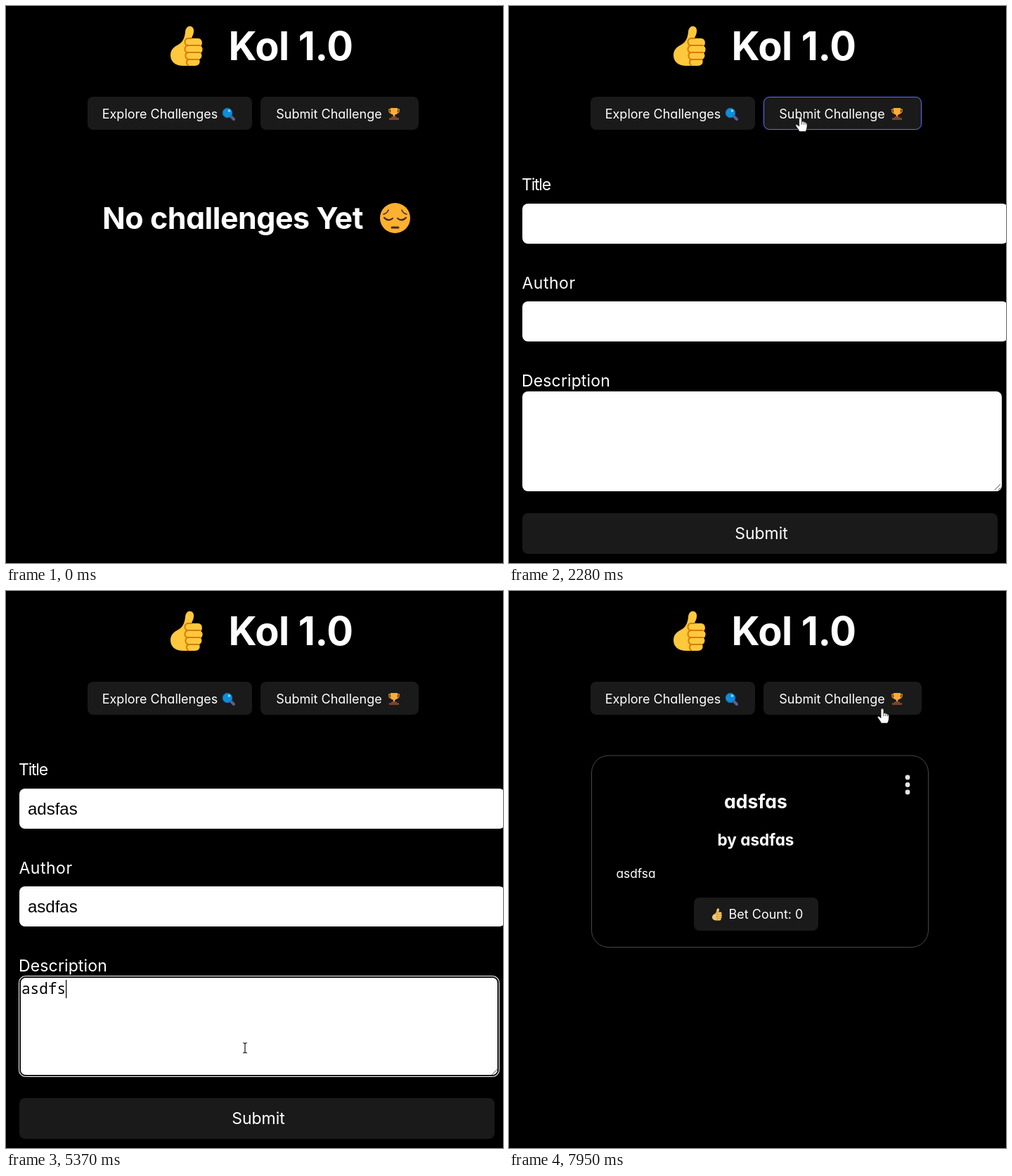
Write an HTML page that moves like this. It is 707 px wide and 792 px high and loops after 8 s.

```html
<!DOCTYPE html>
<html lang="en">
<head>
<meta charset="utf-8">
<title>Challenges</title>
<style>
  html, body { margin: 0; width: 100%; height: 100%; overflow: hidden; background: #000; }
  svg { display: block; }
  text { font: 18px Inter, Lato, sans-serif; font-feature-settings: "cv11"; fill: #fff; white-space: pre; }
  .mid { text-anchor: middle; }
  .bold { font-weight: 700; }
  .label { font-size: 23px; }
  .typed { font: 24px "Liberation Sans", Arial, sans-serif; fill: #000; }
  .mono { font: 21px "Noto Sans Mono", monospace; fill: #000; }
  .hint { font: 11.5px "Open Sans", sans-serif; }
  .btn { fill: #1a1a1a; }
  .edge { fill: none; stroke: #646cff; }
  .field { fill: #fff; }
  .ring rect { fill: none; stroke: #fff; }
  .ring rect + rect { stroke: #101010; stroke-width: 2; }
  .caret { fill: #000; }
</style>
</head>
<body>
<svg width="707" height="792" viewBox="0 0 707 792">
  <defs>
    <symbol id="thumb" viewBox="0 0 46 57" overflow="visible">
      <path fill="currentColor" d="M24 2C27-1 34 1 33 8C33 13 30 16 30 18H39C46 18 46 27 43 29C47 31 46 37 43 39C46 42 44 47 41 48C43 53 40 57 35 57H18C7 57 0 51 0 42C0 34 5 30 11 27C18 23 20 17 21 9C21 6 22 4 24 2Z"/>
      <path fill="none" stroke="#d67d00" stroke-width="2" stroke-linecap="round" d="M30 18H25C19 18 19 28 25 28H42M25 28C19 29 19 38 25 38H42M25 38C20 39 20 47 26 48H40M26 48C22 49 22 54 25 56"/>
    </symbol>
  </defs>

  <use href="#thumb" x="234" y="28" width="46" height="57" color="#ffc83d"/>
  <text class="mid bold" x="405" y="77" style="font-size:56px;letter-spacing:-.4px">Kol 1.0</text>

  <rect class="btn" x="116" y="129" width="234" height="47" rx="8"/>
  <rect class="edge" id="exploreEdge" x="116.5" y="129.5" width="233" height="46" rx="8"/>
  <text class="mid" x="219" y="160">Explore Challenges</text>
  <path d="M319 156L324 161" stroke="#635994" stroke-width="4" stroke-linecap="round"/>
  <circle cx="315" cy="152" r="6.8" fill="#0a8fdd" stroke="#28658f"/>
  <circle cx="317.5" cy="149" r="1.8" fill="#8fd8ff"/>

  <rect class="btn" x="362" y="129" width="225" height="47" rx="8"/>
  <rect class="edge" id="createEdge" x="362.5" y="129.5" width="224" height="46" rx="8"/>
  <text class="mid" x="459.500" y="160">Submit Challenge</text>
  <path d="M547 147H545V149Q545 152 549 153M557 147H559V149Q559 152 555 153" fill="none" stroke="#e0852a" stroke-width="1.5"/>
  <path d="M547 145H557V150Q557 154 553 155V158H551V155Q547 154 547 150Z" fill="#ffab35"/>
  <path d="M549 157H555L556 159H559V162H545V159H548Z" fill="#7a452c"/>

  <g id="empty">
    <text class="mid bold" x="322.500" y="317" style="font-size:43px;letter-spacing:-.5px">No challenges Yet</text>
    <circle cx="553.500" cy="301.500" r="21.500" fill="#ffb02e"/>
    <g fill="none" stroke="#402a32" stroke-width="2.2" stroke-linecap="round">
      <path d="M538 301Q543.500 307 550 302M557 302Q563.500 307 569 301"/>
      <path d="M537 296Q542 295 544 290M570 296Q565 295 563 290" stroke-width="1.5"/>
      <path d="M549 315H558" stroke-width="3"/>
    </g>
  </g>

  <g id="form">
    <text class="label" x="18" y="262" style="letter-spacing:-1.2px">Title</text>
    <rect class="field" x="19" y="281" width="691" height="57" rx="8"/>
    <g class="ring" id="titleRing">
      <rect x="18.500" y="280.500" width="692" height="58" rx="9"/>
      <rect x="20" y="282" width="689" height="55" rx="8"/>
    </g>
    <text class="typed" id="titleText" x="31" y="317.500"></text>

    <text class="label" x="18.500" y="402" style="letter-spacing:.5px">Author</text>
    <rect class="field" x="19" y="420" width="691" height="57" rx="8"/>
    <g class="ring" id="authorRing">
      <rect x="18.500" y="419.500" width="692" height="58" rx="9"/>
      <rect x="20" y="421" width="689" height="55" rx="8"/>
    </g>
    <text class="typed" id="authorText" x="31" y="457"></text>

    <g id="hint">
      <path d="M111 488Q111 486 113 486H122L130 478L138 486H255Q257 486 257 488V525Q257 527 255 527H113Q111 527 111 525Z" fill="#202020"/>
      <text class="hint" x="122" y="511">asdfasd</text>
    </g>

    <text class="label" x="18" y="541" style="letter-spacing:.15px">Description</text>
    <rect class="field" x="19" y="548" width="682" height="142" rx="8"/>
    <path d="M691 688L699 680M696 688L699 685" stroke="#555"/>
    <g class="ring" id="bodyRing">
      <rect x="18.500" y="547.500" width="683" height="143" rx="9"/>
      <rect x="20" y="549" width="680" height="140" rx="8"/>
    </g>
    <text class="mono" id="bodyText" x="22" y="572.500"></text>
    <rect class="caret" id="caret" width="1.200" height="26"/>

    <rect class="btn" x="19" y="721" width="676" height="58" rx="8"/>
    <rect class="edge" id="sendEdge" x="19.500" y="721.500" width="675" height="57" rx="8"/>
    <text class="label mid" x="359" y="758">Submit</text>
  </g>

  <g id="card">
    <rect x="117.500" y="234" width="479" height="272.500" rx="24" fill="none" stroke="#484848"/>
    <g fill="#e4e4e4">
      <circle cx="567" cy="265" r="3.400"/><circle cx="567" cy="275.500" r="3.400"/><circle cx="567" cy="286" r="3.400"/>
    </g>
    <text class="mid bold" x="351" y="309" style="font-size:26.5px">adsfas</text>
    <text class="mid bold" x="351" y="362" style="font-size:22.5px">by asdfas</text>
    <text x="152.500" y="408" style="font-size:17.3px">asdfsa</text>
    <rect class="btn" x="263" y="436" width="177" height="47" rx="8"/>
    <use href="#thumb" x="289" y="451" width="14" height="17.500" color="#eec66c"/>
    <text class="mid" x="365.500" y="466">Bet Count: 0</text>
  </g>

  <g id="pointer">
    <path d="M0 0V15.500L3.600 12.300L6 18L8.700 16.800L6.300 11.300H11Z" fill="#fff" stroke="#000" stroke-width=".8"/>
    <path d="M-2 2Q-2 0 0 0Q2 0 2 2V7Q4 5.500 5 7.500Q7 6.500 7.500 8.500Q9.500 8 9.500 10.500V14Q9.500 17 7.500 21H-1.500Q-3 17.500-6 14Q-7.500 11.500-6 11Q-4 10.500-2 13.500ZM2 7V11M5 8V11M7.500 9V11" fill="#fff" stroke="#000" stroke-width=".7"/>
    <path d="M-3-7H-1L0-6L1-7H3M-3 7H-1L0 6L1 7H3M0-6V6" fill="none" stroke="#111" stroke-width="1.200"/>
  </g>
</svg>
<script>
const LOOP = 8000;
const ARROW = 0, HAND = 1, BEAM = 2;
const el = {};
document.querySelectorAll('[id]').forEach(node => el[node.id] = node);

// time, x, y, shape
const path = [
  [260, 650, 592, ARROW], [600, 480, 380, ARROW], [900, 290, 174, HAND],
  [1020, 246, 155, HAND], [1340, 246, 155, HAND], [1480, 244, 157, HAND],
  [1680, 244, 157, HAND], [2080, 414, 157, HAND], [2420, 415, 158, HAND],
  [2560, 402, 178, ARROW], [2750, 320, 382, ARROW], [2900, 285, 330, BEAM],
  [3100, 279, 307, BEAM], [3640, 279, 307, BEAM], [3920, 247, 449, BEAM],
  [4060, 247, 454, BEAM], [4480, 247, 454, BEAM], [4760, 340, 645, BEAM],
  [5400, 340, 650, BEAM], [5640, 415, 775, ARROW], [5850, 430, 748, ARROW],
  [6200, 461, 738, ARROW], [6310, 461, 738, ARROW], [6570, 545, 622, ARROW],
  [6770, 548, 622, ARROW], [7050, 583, 600, ARROW], [7540, 594, 343, ARROW],
  [7700, 582, 290, ARROW], [7930, 534, 174, HAND], [7950, 531, 167, HAND]
];

// start, end of pointer stay; the border fades over 250 ms
const hovers = {
  exploreEdge: [880, 1740],
  createEdge: [1810, 2540],
  sendEdge: [5780, 6500]
};

// text, first key, time per key, focus from, focus to, left, caret top, key width
const fields = {
  title: ['adsfas', 3300, 75, 3050, 4060, 296],
  author: ['asdfas', 4200, 85, 4060, 4890, 436],
  body: ['asdfsa', 5030, 70, 4890, 6200, 553]
};

const show = (node, on) => node.style.display = on ? '' : 'none';
const within = (t, from, to) => t >= from && t < to;
const clamp = v => Math.max(0, Math.min(1, v));

function drawPointer(t) {
  show(el.pointer, t >= path[0][0]);
  let i = path.findLastIndex(p => p[0] <= t);
  if (i < 0) return;
  const a = path[i], b = path[i + 1] || a;
  const k = b === a ? 0 : (t - a[0]) / (b[0] - a[0]);
  const x = a[1] + (b[1] - a[1]) * k, y = a[2] + (b[2] - a[2]) * k;
  el.pointer.setAttribute('transform', `translate(${x} ${y})`);
  [...el.pointer.children].forEach((shape, n) => show(shape, n === a[3]));
}

function drawFields(t) {
  let focused = false;
  for (const [name, [word, start, step, from, to, top]] of Object.entries(fields)) {
    const count = Math.max(0, Math.min(word.length, Math.floor((t - start) / step) + 1));
    const text = el[name + 'Text'];
    const typed = word.slice(0, count);
    if (text.textContent !== typed) text.textContent = typed;
    const focus = within(t, from, to);
    show(el[name + 'Ring'], focus);
    if (!focus) continue;
    focused = (t - Math.max(from, Math.min(t, start + step * (word.length - 1)))) % 1000 < 500;
    const left = +text.getAttribute('x') + (typed ? text.getComputedTextLength() : .7);
    el.caret.setAttribute('x', left);
    el.caret.setAttribute('y', top);
  }
  show(el.caret, focused);
  show(el.hint, within(t, 4200, 4760));
}

function draw(t) {
  show(el.empty, t < 2280);
  show(el.form, within(t, 2280, 6500));
  show(el.card, t >= 6570);
  for (const [name, [from, to]] of Object.entries(hovers)) {
    el[name].style.opacity = Math.min(clamp((t - from) / 250), 1 - clamp((t - to) / 250));
  }
  if (within(t, 2280, 6500)) drawFields(t);
  drawPointer(t);
}

const begin = performance.now();
function tick() {
  draw((performance.now() - begin) % LOOP);
  requestAnimationFrame(tick);
}
tick();
</script>
</body>
</html>
```
